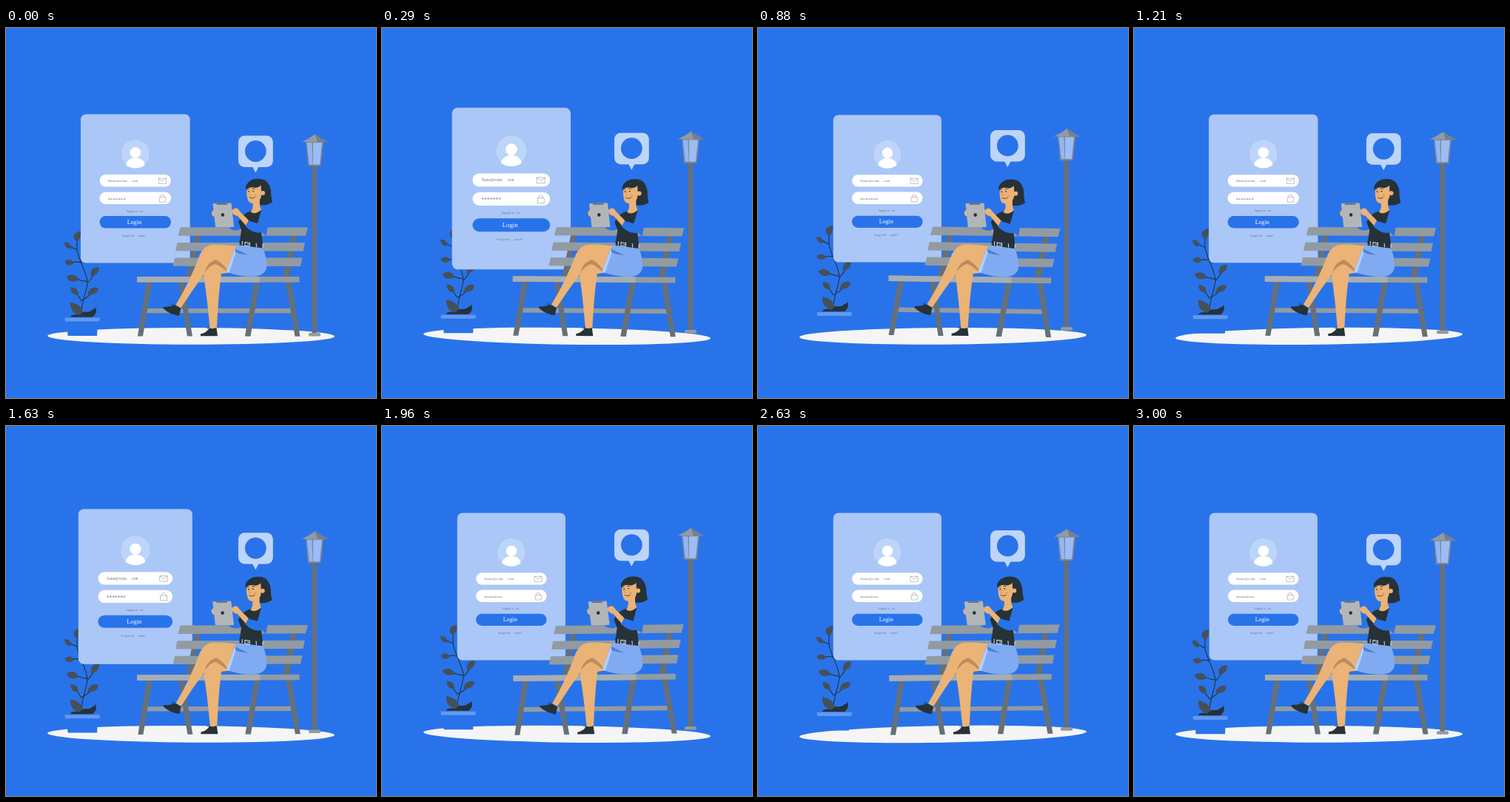
Write an HTML page that moves like this. It is 500 by 500 pixels and loops after 3.04 s.

```html
<!DOCTYPE html>
<html lang="en">
<head>
<meta charset="utf-8">
<title>Login on a park bench</title>
<style>
  html, body { margin: 0; width: 100%; height: 100%; overflow: hidden; background: #2973ea; }
  svg { display: block; width: 100vw; height: 100vh; }
  text { font-family: "Liberation Serif", "Noto Serif", serif; fill: #6f7784; }
  .bg { fill: #2973ea; }
  .ink { fill: #263238; }
  .pale { fill: #bed5fa; }
  .steel { fill: #929ba2; }
  .post { fill: #667078; }
  .skin { fill: #ebb376; }
  .leaf { fill: #455059; }
  .line { fill: none; stroke: #263238; stroke-linecap: round; }
  .icon { fill: none; stroke: #9a9a9f; stroke-width: .6; }
</style>
</head>
<body>
<svg viewBox="0 0 500 500">
  <ellipse id="ground" cx="250" cy="416.4" rx="194" ry="11.3" fill="#f5f5f5"/>

  <g id="plant">
    <path class="bg" d="M82 397H124L123 416.4H83.5Z"/>
    <path class="line" stroke-width="1.1" d="M101 390C102 371 109 357 110 345C110 331 98 315 96 300Q95 290 98 277M96 300Q90 298 87 295M102 317Q93 316 89 317M109 343Q100 342 95 339M110 345Q117 338 119 332M102 369Q97 362 95 358M103 368Q111 364 115 359"/>
    <g class="leaf">
      <path d="M96 289C88 284 91 276 101 275Q102 285 96 289Z"/>
      <path d="M88 299C81 299 79 294 79 290Q88 289 88 299Z"/>
      <path d="M92 318C87 323 80 321 79.5 316Q87 310 92 318Z"/>
      <path d="M98 341C91 345 83 343 82 336Q94 330 98 341Z"/>
      <path d="M115 336C113 327 119 322 126 324Q126 334 115 336Z"/>
      <path d="M98 362C90 361 87 357 87.500 351Q98 350 98 362Z"/>
      <path d="M110 361C112 352 119 349 125 352Q124 362 110 361Z"/>
      <path d="M101 389C91 388 86 380 87 371Q102 374 104 385Z"/>
    </g>
    <path class="ink" d="M87 391Q88 387 95 388Q101 386 105 384Q113 385 117 381Q121 380 121 377Q124 386 117 391Z"/>
    <path class="leaf" d="M87 372Q102 374 103 385L99 389Q87 383 87 372Z"/>
    <path fill="#6399f0" d="M79.500 392H127L126 397H80Z"/>
  </g>

  <g id="lamp">
    <path class="post" d="M413.500 186H420V413H413.500Z"/>
    <rect class="steel" x="409" y="412.300" width="16" height="4.500" rx="1.500"/>
    <path fill="#7d858b" d="M405 154H429L425.500 187H408Z"/>
    <path fill="#91b5f5" d="M406.500 155.500H413.500L414.500 185H409.800Z"/>
    <path fill="#9bbcf6" d="M415 155.500H427L424 185H415Z"/>
    <path class="steel" d="M417.500 144L424 148.500L435 154.500H400L411 148.500Z"/>
    <path fill="#7b7f83" d="M417.500 144L424 148.500L435 154.500H421Z"/>
  </g>

  <g id="card">
    <rect x="101.700" y="117.500" width="146.200" height="199" rx="7" fill="#abc7f7"/>
    <circle class="pale" cx="174.800" cy="170.500" r="19.200" stroke="#9fbdf2" stroke-width=".6"/>
    <circle cx="174.900" cy="168.800" r="7.200" fill="#fff"/>
    <path fill="#fff" d="M162 185.500C164 172.500 186 172.500 187.500 185.500Q175 194 162 185.500Z"/>
    <g fill="#fff">
      <rect x="127" y="198.300" width="95.500" height="16.300" rx="8.150"/>
      <rect x="127" y="221.600" width="95.500" height="16.300" rx="8.150"/>
    </g>
    <rect class="bg" x="127" y="253.700" width="95.500" height="16.300" rx="8.150"/>
    <text x="138" y="208.200" font-size="4.800">Name@velm.</text>
    <text x="170" y="208.200" font-size="4.800">com</text>
    <text x="137.800" y="233.700" font-size="7">*******</text>
    <path class="icon" d="M206 203.300H216.200V210.300H206ZM206 203.300L211.100 207.300L216.200 203.300"/>
    <path class="icon" d="M207 228.500H215.300V235H207ZM208.700 228.500V227C209 224.600 213.300 224.600 213.600 227V228.500"/>
    <text x="162.800" y="248.200" font-size="4">Signup or</text>
    <text x="181" y="248.200" font-size="4">on</text>
    <text x="173.300" y="264.300" font-size="8" text-anchor="middle" style="fill:#fff">Login</text>
    <text x="157" y="281.200" font-size="4">Forgot the</text>
    <text x="178" y="281.200" font-size="4">email?</text>
  </g>

  <g id="bubble">
    <path class="pale" d="M332.500 187H342L337.300 196Z"/>
    <rect class="pale" x="314" y="146" width="46.800" height="42.400" rx="8.500"/>
    <circle class="bg" cx="337.300" cy="166.900" r="14.400"/>
  </g>

  <g id="sitter">
    <!-- bench -->
    <path class="post" d="M255 280H262.500L252 336H243.500ZM385 280H393L383 336H374Z"/>
    <path class="steel" d="M235.500 269.300H408L405 280.700H232.500ZM231.500 290H404L401.500 301.300H229ZM228 310.500H400.500L398 321.800H225.500ZM190 379H387.500V385.200H190Z"/>
    <path class="post" d="M190 343H197.500L185 416.600H178ZM233 343H240L252 416.600H245ZM335.500 343H343L330.500 416.600H323ZM378 343H385.500L397.500 416.600H390.500Z"/>
    <path class="steel" d="M177 336H396.500V343.700H177Z"/>
    <path fill="#a7aeb3" d="M177 336H343V343.700H177Z"/>

    <!-- legs -->
    <path class="skin" d="M267 334Q269 317 284 313L306 330L291 332Q287 360 285 406H275.500Q272 365 267 334Z"/>
    <path fill="#bd8b5e" d="M267 335Q267 318 283 312L302 326L299 330Q288 320 282 319Q271 323 267 335Z"/>
    <path class="skin" d="M314 295Q293 292 279 292.500Q268 294 262 306Q248 344 229.500 374L236 379Q252 354 269 331Q270 318 284 313Q293 318 299 327L309 311Z"/>
    <path class="ink" d="M212.500 377Q222 377 228 374.500L236.500 378.500L234 389Q221 387 212.500 379Z"/>
    <path class="ink" d="M263 413.500Q271 412 275 405.500Q280 407 284.500 405L286 416.200H263Z"/>
    <path class="line" stroke-width=".7" d="M228 376L223 373.500M228 376L226 371.800M276 407L271.500 405.500M275 407L274 403.500"/>

    <!-- skirt and belt -->
    <path fill="#80abf3" d="M315 292Q331 293 347 297Q353 311 352 325Q349 334 338 335.500Q316 337 298 329.500L308 299Z"/>
    <path fill="#b3cff9" d="M309 299L311.500 300L301.500 331L297.500 329.500Z"/>
    <path fill="#527fc8" d="M310 298.500L327 306.500Q316 306 310 303Z"/>
    <path class="ink" d="M315.500 287L347 291.500V297.500L315.500 293.500Z"/>
    <path stroke="#dce8fb" fill="none" stroke-width="1" d="M323 289.500L329.500 290.300L329 295L322.800 294.200ZM326 292.300H328.500M319.500 287.500L319 293.500M338 290L338.500 296M347 291V297"/>

    <!-- far arm, torso -->
    <path class="bg" d="M303 267L317 261L319 271Q311 276 302 271Z"/>
    <path class="ink" d="M331 247L345 246L350 253L345 276L347 292L316 287.500L318 273L314 262Q318 251 331 247Z"/>

    <!-- head -->
    <path class="ink" d="M324 214C327 206 336 203 342 204C352 203 357 212 358 220Q358 229 360 235Q352 242 336 238Z"/>
    <path class="skin" d="M333 234L343 231Q342 241 345 245.500Q337 253 330.500 248.500Q335 244 333 234Z"/>
    <path class="skin" d="M327 215Q339 216 344.500 212L345 222Q346 235 334 237Q327 237 326 229Q324 220 327 215Z"/>
    <path class="ink" d="M324 214Q329 207 338 206L346 210Q344 215 337 216Q330 213 324 219Z"/>
    <circle class="skin" cx="347" cy="223" r="3"/>
    <circle cx="337" cy="226.500" r="1.700" fill="#e99a62"/>
    <path class="line" stroke-width=".8" d="M329 229Q333 231.500 336 229M326.500 218L328.500 217.300M332.500 217Q334.500 215.800 336 217"/>
    <path class="line" stroke="#c98a55" stroke-width=".6" style="stroke:#c98a55" d="M329.800 221L328.500 225.500L330.500 225.800"/>
    <circle class="ink" cx="328" cy="220.800" r=".9"/>
    <circle class="ink" cx="334" cy="220.300" r=".9"/>

    <!-- tablet and near arm -->
    <path class="skin" d="M284 246Q277 246 278 251Q278 255 285 256Z"/>
    <path fill="#b3b6b9" stroke="#b3b6b9" stroke-width="2" stroke-linejoin="round" d="M280.500 238.200L303.500 237.500L307 268L284 268.300Z"/>
    <path fill="#6f767c" d="M284 236.700H299V239H285Z"/>
    <circle class="ink" cx="292.800" cy="252.600" r="2.300"/>
    <path class="skin" d="M305 247Q308 242 313 244L317 249L328 260L325 268Q317 259 313 254Q306 253 305 247Z"/>
    <path class="bg" d="M345 246Q351 251 356 262L353.500 269L351.500 281L345.500 276Q335 279 323.500 268L327.500 260.500L340 264Z"/>
  </g>
</svg>
<script>
  const LOOP = 3040;
  const PULSE = [[0, 1], [.1, 1.1], [.3, 1], [.4, 1], [.5, 1.1], [.6, 1], [1, 1]];
  const FLOAT = [[0, 0], [.5, -10], [1, 0]];
  const SWAY = [[0, 0], [.25, 1], [.75, -1], [1, 0]];

  // Linear interpolation between keyframes
  function mix(keys, p) {
    const i = keys.findIndex(k => k[0] > p);
    const [a, u] = keys[i - 1], [b, v] = keys[i];
    return u + (v - u) * (p - a) / (b - a);
  }

  const move = (id, value) => document.getElementById(id).setAttribute("transform", value);

  function draw(now) {
    const p = (now / LOOP + .01) % 1;
    const half = p * 2 % 1;
    const lift = `translate(0 ${mix(FLOAT, half)})`;
    ["plant", "lamp", "bubble"].forEach(id => move(id, lift));
    move("ground", `rotate(${mix(SWAY, half)} 250 416.4)`);
    move("sitter", `rotate(${mix(SWAY, p)} 292.5 310)`);
    move("card", `translate(174.8 217) scale(${mix(PULSE, p)}) translate(-174.8 -217)`);
  }

  const start = performance.now();
  function tick() {
    draw(performance.now() - start);
    requestAnimationFrame(tick);
  }
  tick();
</script>
</body>
</html>
```
